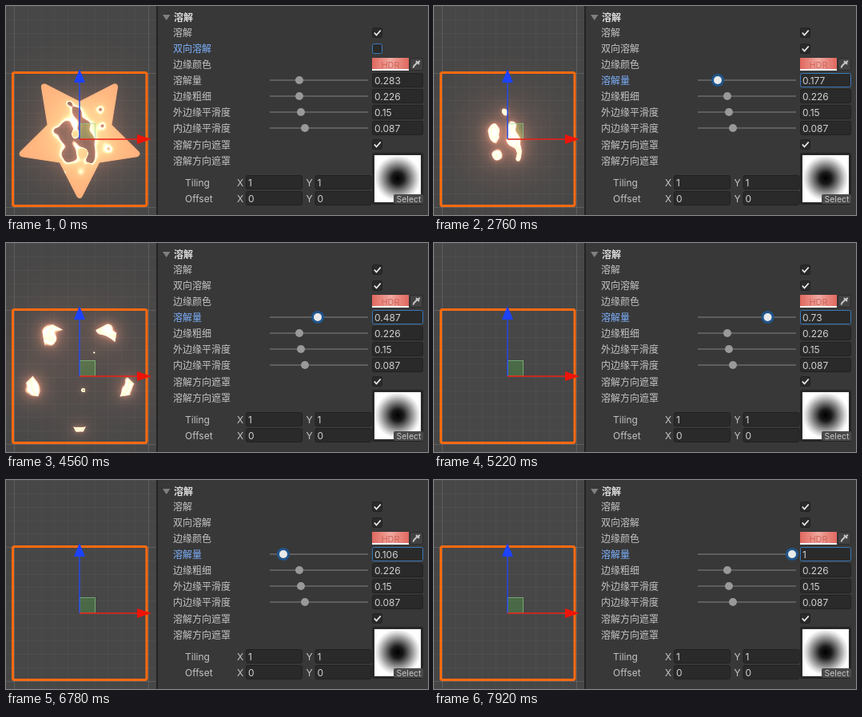
Animation, 528 px wide and 262 px high, one loop 9 s. Source, as an HTML page with a canvas:

```html
<!DOCTYPE html>
<html lang="zh-CN">
<head>
<meta charset="utf-8">
<title>溶解</title>
<style>
html, body { margin: 0; width: 528px; height: 262px; overflow: hidden; background: #383838; }
canvas, svg { position: absolute; left: 0; top: 0; display: block; }
text { font: 12px Inter, "Noto Sans CJK SC", "Noto Sans CJK", "Noto Sans", sans-serif; fill: #c4c4c4; }
.field { fill: #2a2a2a; stroke: #212121; }
.value { fill: #d2d2d2; }
.tick { fill: none; stroke: #eee; stroke-width: 1.8; }
</style>
</head>
<body>
<canvas id="scene" width="189" height="262"></canvas>
<svg id="ui" width="528" height="262" viewBox="0 0 528 262">
  <defs>
    <radialGradient id="mask">
      <stop offset="0" stop-color="#000"/>
      <stop offset=".25" stop-color="#1a1a1a"/>
      <stop offset=".6" stop-color="#8c8c8c"/>
      <stop offset=".85" stop-color="#dcdcdc"/>
      <stop offset="1" stop-color="#fff"/>
    </radialGradient>
    <linearGradient id="hdr">
      <stop offset="0" stop-color="#e0685f"/>
      <stop offset=".3" stop-color="#e98d84"/>
      <stop offset=".5" stop-color="#efaaa2"/>
      <stop offset=".7" stop-color="#e98d84"/>
      <stop offset="1" stop-color="#e0685f"/>
    </linearGradient>
  </defs>
  <rect x="8.5" y="83.5" width="167.5" height="167" rx="2" fill="none" stroke="#ff6a10" stroke-width="3"/>
  <rect x="92.5" y="147.5" width="19" height="19" fill="none" stroke="#8fd08f" stroke-opacity=".6"/>
  <path d="M92 167V95" stroke="#2348f5" stroke-width="1.4"/>
  <path d="M85 96L92 79L99 96Z" fill="#1c42ff"/>
  <path d="M92 167H165" stroke="#ee1c14" stroke-width="1.4"/>
  <path d="M164 161V173L182 167Z" fill="#ee1408"/>
  <rect x="188" width="340" height="262" fill="#383838"/>
  <rect x="188" width="2" height="262" fill="#232323"/>
  <path d="M196 11H205.5L200.7 18Z" fill="#808080"/>
  <g id="panel"></g>
</svg>
<script>
const W = 189, H = 262, LOOP = 9000, STEP = 60;
const BLUE = '#7db0fb', FOCUS = '#3a79bb';
const panel = document.getElementById('panel');

function add(tag, attrs, text) {
  const node = document.createElementNS('http://www.w3.org/2000/svg', tag);
  for (const key in attrs) node.setAttribute(key, attrs[key]);
  if (text !== undefined) node.textContent = text;
  panel.append(node);
  return node;
}
const label = (x, y, text, extra) => add('text', { x, y: y + 4.5, ...extra }, text);
const box = (x, y, width, height) => add('rect', { x, y, width, height, rx: 2, class: 'field' });

function checkbox(y) {
  const frame = box(458.5, y - 6, 12, 12);
  const tick = add('path', { d: `M460.8 ${y}l2.7 3 5.2-6`, class: 'tick' });
  return { frame, tick };
}

const knobX = v => 335 + 113 * v;

function slider(y, v, x) {
  add('path', { d: `M330 ${y}H453`, stroke: '#5e5e5e', 'stroke-width': 2 });
  const halo = add('circle', { cx: x, cy: y, r: 8, fill: '#20568c', visibility: 'hidden' });
  const knob = add('circle', { cx: x, cy: y, r: 5, fill: '#999' });
  const frame = box(458.5, y - 8.5, 63, 17);
  const value = label(461, y, v, { class: 'value' });
  return { halo, knob, frame, value };
}

// Inspector panel
label(210, 14, '溶解', { style: 'font-weight:700;fill:#dcdcdc' });
label(209, 33.5, '溶解');
checkbox(33.5);
const twoWayLabel = label(209, 53.5, '双向溶解');
const twoWay = checkbox(53.5);
label(209, 73.5, '边缘颜色');
add('rect', { x: 458, y: 65, width: 46, height: 16, fill: 'url(#hdr)' });
add('rect', { x: 458, y: 79, width: 46, height: 2, fill: '#f4f4f4' });
label(481, 73, 'HDR', { 'text-anchor': 'middle', style: 'font-size:11px;fill:#d0645a' });
add('rect', { x: 505.5, y: 65.5, width: 16, height: 15, rx: 2, fill: '#424242', stroke: '#2b2b2b' });
add('path', { d: 'M509.5 77.5l1-2.5 4-4M513 69l4 4M515.5 71l2.2-2.2', stroke: '#c8c8c8', 'stroke-width': 2, fill: 'none' });
const amountLabel = label(209, 93.5, '溶解量');
const amount = slider(93, 0.283, knobX(0.283));
[['边缘粗细', 0.226, 367], ['外边缘平滑度', 0.15, 369], ['内边缘平滑度', 0.087, 374]].forEach(([name, v, x], i) => {
  label(209, 113.5 + i * 20.2, name);
  slider(113 + i * 20, v, x);
});
label(209, 174, '溶解方向遮罩');
checkbox(173.5);
label(209, 194, '溶解方向遮罩');
add('rect', { x: 458.5, y: 184.5, width: 63, height: 64, rx: 2, fill: '#2a2a2a', stroke: '#212121' });
add('rect', { x: 461, y: 187, width: 58, height: 59, fill: '#fff' });
add('circle', { cx: 490, cy: 216, r: 29, fill: 'url(#mask)' });
add('rect', { x: 485, y: 236, width: 37, height: 12, rx: 2, fill: '#4a4a4a' });
label(504, 241, 'Select', { 'text-anchor': 'middle', style: 'font-size:10.5px' });
[['Tiling', 1, 221.5], ['Offset', 0, 241.5]].forEach(([name, v, y]) => {
  label(224, y, name);
  [['X', 289], ['Y', 375.5]].forEach(([axis, x]) => {
    label(x, y, axis);
    box(x + 11.5, y - 9, 70, 17);
    label(x + 14, y, v, { class: 'value' });
  });
});

// Dissolve field: radial growth plus elliptical bumps [x, y, rx, ry, height]
const CX = 92, CY = 162;
const bumps = [
  [88, 131, 8, 8, -.13], [74, 158, 9, 13, -.14], [98, 147, 7, 7, -.09], [98, 165, 8, 11, -.12],
  [78, 188, 10, 10, -.14], [104, 187, 8, 16, -.14], [79, 121, 6, 5, -.12], [118, 128, 8, 7, -.12],
  [121, 150, 5, 5, -.07], [129, 180, 8, 8, -.11], [72, 209, 5, 5, -.14], [60, 155, 6, 6, -.07],
  [92, 208, 9, 8, -.05], [92, 222, 12, 14, -.1], [97, 184, 5, 5, .3], [86, 160, 4, 4, .17],
  [103, 200, 3, 3, .14], [110, 137, 4, 4, .16], [57, 124, 7, 10, .08], [124, 111, 12, 6, .05],
  [37, 179, 9, 10, .04], [150, 183, 9, 10, .03]
];
function fieldAt(x, y) {
  const r = Math.hypot(x - CX, y - CY);
  let d = .265 + .2 * (r / 62) ** 2;
  d += .014 * Math.sin(x * .27 + 1.5 * Math.sin(y * .13)) * Math.sin(y * .24 + 1.3 * Math.sin(x * .11));
  for (const [bx, by, rx, ry, h] of bumps) d += h * Math.exp(-(((x - bx) / rx) ** 2) - ((y - by) / ry) ** 2);
  return Math.max(d, .153);
}
const field = Float32Array.from({ length: W * H }, (_, i) => fieldAt(i % W, Math.floor(i / W)));

function layer() {
  const canvas = document.createElement('canvas');
  canvas.width = W;
  canvas.height = H;
  return canvas.getContext('2d');
}
const star = layer(), body = layer(), glow = layer(), backdrop = layer();
const bodyPixels = body.createImageData(W, H), glowPixels = glow.createImageData(W, H);
const ctx = document.getElementById('scene').getContext('2d');

star.lineWidth = 8;
star.lineJoin = 'round';
star.beginPath();
for (let i = 0; i < 10; i++) {
  const r = i % 2 ? 38 : 75, a = Math.PI * (.5 + i / 5);
  star.lineTo(CX + r * Math.cos(a), CY + r * Math.sin(a));
}
star.closePath();
star.fill();
star.stroke();

backdrop.fillStyle = '#474747';
backdrop.fillRect(0, 0, W, H);
for (let k = -5; k < 12; k++) {
  const p = Math.round(k * 16.75);
  backdrop.fillStyle = `rgba(255,255,255,${k % 10 ? .03 : .12})`;
  backdrop.fillRect(10 + p, 0, 1, H);
  backdrop.fillRect(0, 84 + p, W, 1);
}
backdrop.fillStyle = 'rgba(80,160,70,.38)';
backdrop.fillRect(92, 147, 20, 20);

const smooth = (a, b, x) => {
  const t = Math.min(1, Math.max(0, (x - a) / (b - a)));
  return t * t * (3 - 2 * t);
};
const peak = (x, w) => Math.exp(-((x / w) ** 2));
const bloom = [[3, .45], [10, .7], [20, .35], [42, 1], [42, .6]];

function drawScene(v, both) {
  const b = bodyPixels.data, g = glowPixels.data;
  for (let i = 0; i < field.length; i++) {
    const d = field[i] - v, k = i * 4;
    let alpha = smooth(-.046, -.024, d), edge = peak(d + .027, .024);
    if (both) {
      alpha *= 1 - smooth(.024, .046, d);
      edge += peak(d - .027, .024);
    }
    edge = Math.min(1, edge);
    b[k] = 244 + 11 * edge;
    b[k + 1] = 167 + 75 * edge;
    b[k + 2] = 119 + 92 * edge;
    b[k + 3] = 255 * alpha;
    g[k] = 255;
    g[k + 1] = 128;
    g[k + 2] = 88;
    g[k + 3] = 255 * alpha * (.05 + .95 * edge);
  }
  for (const [target, pixels] of [[body, bodyPixels], [glow, glowPixels]]) {
    target.putImageData(pixels, 0, 0);
    target.globalCompositeOperation = 'destination-in';
    target.drawImage(star.canvas, 0, 0);
    target.globalCompositeOperation = 'source-over';
  }
  ctx.drawImage(backdrop.canvas, 0, 0);
  ctx.drawImage(body.canvas, 0, 0);
  ctx.globalCompositeOperation = 'lighter';
  for (const [radius, strength] of bloom) {
    ctx.filter = `blur(${radius}px)`;
    ctx.globalAlpha = strength;
    ctx.drawImage(glow.canvas, 0, 0);
  }
  ctx.filter = 'none';
  ctx.globalAlpha = 1;
  ctx.globalCompositeOperation = 'source-over';
}

// Slider drag as [time, value]
const drag = [
  [0, .283], [2520, .283], [2580, .26], [2700, .26], [2760, .177], [3000, .1], [3420, .1],
  [3960, .239], [4560, .487], [5220, .73], [5520, .73], [6000, .38], [6360, .09], [6720, .09],
  [6780, .106], [7680, .912], [7740, .947], [7860, .947], [7920, 1], [LOOP, 1]
];
function amountAt(t) {
  const i = drag.findIndex(([time]) => time > t);
  const [t0, v0] = drag[i - 1], [t1, v1] = drag[i];
  return v0 + (v1 - v0) * (t - t0) / (t1 - t0);
}

function render(t) {
  const v = amountAt(t), both = t >= 1680, active = t >= 2400;
  const hover = (t >= 240 && t < 840) || t >= 1920;
  twoWayLabel.style.fill = active ? '' : BLUE;
  twoWay.frame.style.stroke = active ? '' : FOCUS;
  twoWay.tick.style.visibility = both ? 'visible' : 'hidden';
  amountLabel.style.fill = active ? BLUE : '';
  amount.frame.style.stroke = active ? FOCUS : '';
  amount.halo.setAttribute('visibility', active ? 'visible' : 'hidden');
  amount.halo.setAttribute('cx', knobX(v));
  amount.knob.setAttribute('cx', knobX(v));
  amount.knob.setAttribute('fill', hover ? '#eaeaea' : '#999');
  amount.value.textContent = +v.toFixed(3);
  drawScene(v, both);
}

const start = performance.now();
let last = -1;
function tick() {
  const t = Math.floor((performance.now() - start) % LOOP / STEP) * STEP;
  if (t !== last) render(last = t);
  requestAnimationFrame(tick);
}
tick();
</script>
</body>
</html>
```
